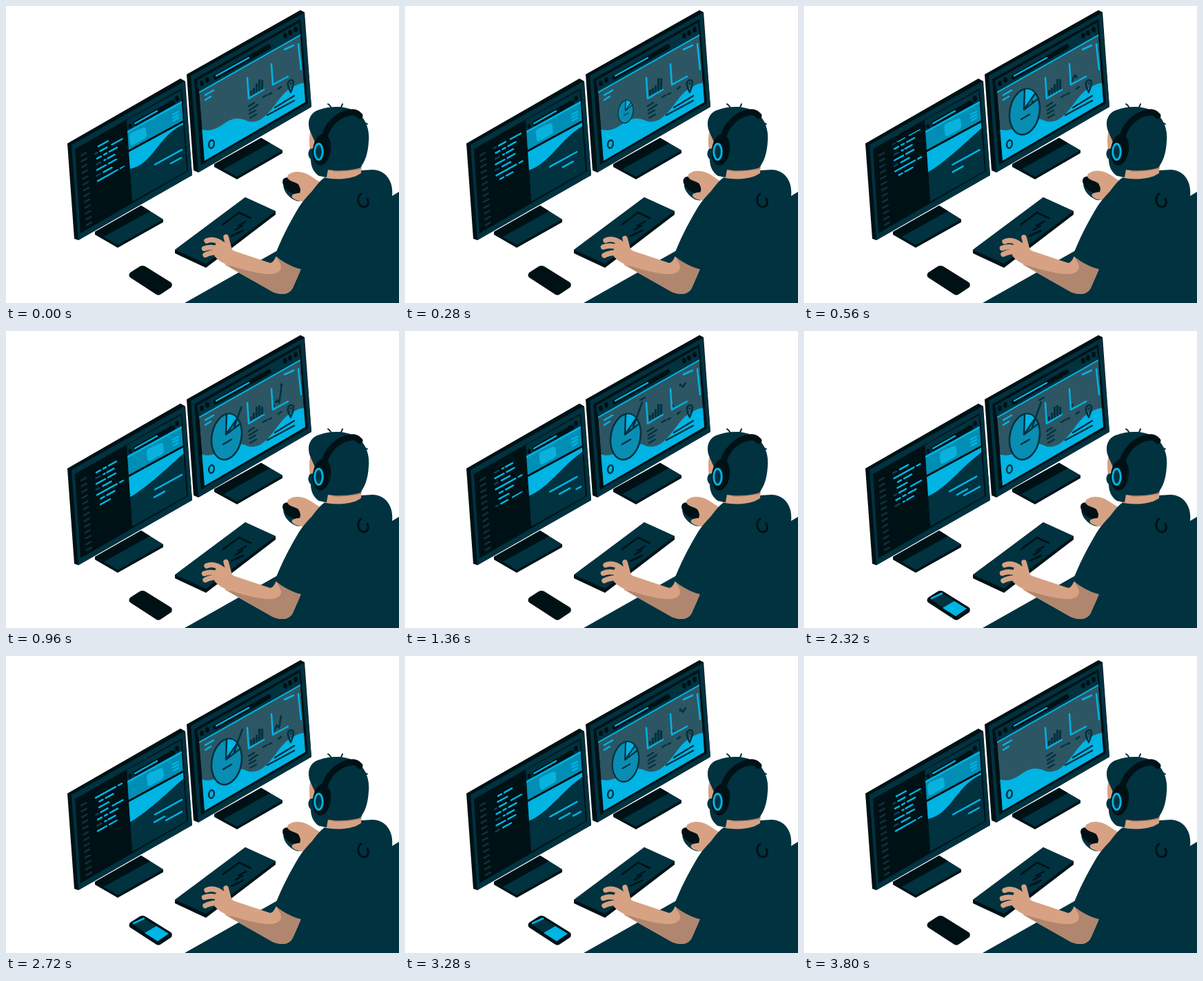
These frames come from a looping animation (570 by 430 pixels, 3.84 s). An HTML page:

```html
<!DOCTYPE html>
<html lang="en">
<head>
<meta charset="utf-8">
<title>Desk with two screens</title>
<style>
html, body { margin: 0; width: 100%; height: 100%; overflow: hidden; background: #fff; }
svg { display: block; width: 100vw; height: 100vh; }
.n { fill: #003240; } .k { fill: #001115; } .c { fill: #00b4e4; }
.s { fill: #d6a283; } .d { fill: #b0866e; } .g { fill: #2c5664; }
.ln, .lk, .lc { fill: none; stroke-width: 2.5; stroke-linecap: round; stroke-linejoin: round; }
.ln { stroke: #003240; } .lk { stroke: #001115; } .lc { stroke: #00b4e4; }
</style>
</head>
<body>
<svg viewBox="0 0 570 430">
  <defs>
    <clipPath id="panel"><path d="M175 165L253.500 122L262 239L183 283Z"/></clipPath>
    <clipPath id="screen"><path d="M280 124L427 41L434 139L288 224Z"/></clipPath>
    <clipPath id="editor"><path d="M124 202L172 176L176 230L126 260Z"/></clipPath>
  </defs>

  <!-- left monitor -->
  <path class="k" d="M129 327L196 289L228 309V313L162 350L129 331Z"/>
  <path class="n" d="M129 327L196 289L228 309L162 346Z"/>
  <path class="k" d="M129 327L196 289L209 297L142 334Z"/>
  <path class="k" d="M89 199L253 105L260 109L270 245L105 339L99 337Z"/>
  <path class="n" d="M95 201L259 109L270 245L105 339Z"/>
  <path class="k" d="M100 207L255 119L264 239L108 329Z"/>
  <path id="gutter" class="lk" style="stroke:#12313b"/>
  <g id="code" clip-path="url(#editor)"></g>
  <g clip-path="url(#panel)">
    <path class="n" d="M175 165L256 120L266 239L183 285Z"/>
    <path d="M175 182L257 137L259 166L177 210Z" fill="#008eb5"/>
    <path class="lc" d="M175 183L257 138"/>
    <path id="box" d="M183 183L199 176Q203 175 203 179L204 187Q204 190 201 192L185 201Q180 203 180 198L179 189Q179 185 183 183Z" fill="#08b2dd"/>
    <path class="lc" d="M242 157L250 153M242 161.500L250 157.500M243 166L250 162"/>
    <path id="hill" class="c"/>
    <path class="lk" style="stroke-width:3" d="M176 211L259 166"/>
    <path id="lines" class="lc"/>
  </g>
  <path class="lk" style="stroke-width:7" d="M188 170L242 140"/>
  <path class="lc" d="M187 170L219 152"/>
  <g class="k"><ellipse cx="180" cy="174" rx="2.500" ry="3.500"/><ellipse cx="239" cy="141" rx="3" ry="4"/><ellipse cx="248" cy="134" rx="3" ry="4"/></g>

  <!-- right monitor -->
  <path class="k" d="M302 229L370 191L401 209V213L335 251L302 233Z"/>
  <path class="n" d="M302 229L370 191L401 209L335 247Z"/>
  <path class="k" d="M302 229L370 191L383 198.500L315 236.500Z"/>
  <path class="k" d="M262 99L427 6L433 9L443 146L279 241L272 238Z"/>
  <path class="n" d="M268 101L432 10L443 146L279 241Z"/>
  <path class="k" d="M273 106L427 19L438 141L283 230Z"/>
  <path class="n" d="M277 108L425 24L427 41L280 124Z"/>
  <path class="lk" style="stroke-width:7" d="M304 103L381 59"/>
  <path class="lc" d="M305 101L352 75"/>
  <g class="k"><ellipse cx="284" cy="112" rx="3" ry="4"/><ellipse cx="292" cy="107" rx="3" ry="4"/><ellipse cx="405" cy="43" rx="3" ry="4"/><ellipse cx="412" cy="39" rx="3" ry="4"/><ellipse cx="420" cy="34" rx="3" ry="4"/></g>
  <g clip-path="url(#screen)">
    <path class="g" d="M280 124L427 41L434 139L288 224Z"/>
    <path class="c" d="M283 178C294 183 306 178 318 169C330 161 340 162 349 166C356 169 366 168 375 160C386 151 394 136 404 126C414 117 424 112 435 111V142L286 226Z"/>
    <path class="lc" style="stroke-width:3" d="M279 125L428 41"/>
  </g>
  <path class="lc" d="M289 129L301 122M289 136L297 131M404 63L417 57M424 55L428 92M350 104L352 134L374 121M385 84L387 114L409 102"/>
  <path class="ln" d="M352 145L360 140M353 151L365 143M353 156L362 151M354 162L363 157M373 132L378 129M381 128L385 126M395 120L399 117M390 147L418 130M379 158L418 137"/>
  <ellipse class="ln" cx="298" cy="200" rx="3.800" ry="5.800" transform="rotate(10 298 200)"/>
  <path class="ln" d="M413 125C410 119 408 115 409 111C411 106 417 106 417 111C417 117 414 121 413 125Z"/>
  <circle class="n" cx="413" cy="112" r="1.500"/>
  <path id="bars" class="ln" style="stroke-width:3.200;stroke-linecap:butt"/>
  <path id="spark" class="ln" pathLength="100"/>
  <g id="pie">
    <ellipse rx="21.500" ry="33.500" transform="rotate(10)" fill="#0a8db2" stroke="#003240" stroke-width="2.500"/>
    <path class="c" d="M-1 -3L0 -32Q9 -34 15 -26Z"/>
    <path class="ln" d="M0 -32L-1 -3L15 -26M-1 -3L20 -19M-5 11L7 4"/>
  </g>
  <path id="pointer" class="ln" pathLength="100" d="M331 139L344 103"/>
  <path id="label" class="ln" d="M341 100L348 96.500"/>

  <!-- desk items -->
  <path class="k" d="M245 353L347 277L391 297V302L290 379L245 358Z"/>
  <path class="n" d="M245 353L347 277L391 297L290 373Z"/>
  <path class="lk" d="M315 316L338 299L355 307M337 318L348 312M333 324L343 318M327 333L344 325"/>
  <path class="k" d="M180 386L194 377Q198 375 202 377L239 400Q242 402 240 407L225 417Q221 420 217 417L180 393Q177 390 180 386Z"/>
  <g id="phone">
    <path class="n" d="M183 388L199 379L236 402L220 413Z"/>
    <path class="c" d="M201 401L218 391L236 402L220 413Z"/>
    <path class="lc" d="M185 387L200 380"/>
  </g>

  <!-- person -->
  <path class="n" d="M259 430L392 355L560 275L570 269V430Z"/>
  <g id="mouse">
    <ellipse class="n" cx="417" cy="268" rx="18" ry="10" transform="rotate(45 417 268)"/>
    <ellipse class="k" cx="414" cy="260" rx="15" ry="9" transform="rotate(40 414 260)"/>
    <path class="s" d="M412 243C418 238 430 240 438 244C446 248 452 254 460 257L438 284C428 282 420 283 415 277C413 273 419 271 426 271C428 266 427 262 424 258C418 254 410 254 408 248C408 245 410 243 412 243Z"/>
  </g>
  <path class="s" d="M326 353L383 372C389 371 390 365 393 360L428 381L416 408C411 418 400 419 387 414L318 375Z"/>
  <path class="d" d="M318 374C350 383 388 396 398 382C402 374 392 367 392 360L428 381L416 408C411 418 400 419 387 414Z"/>
  <g id="hand">
    <path class="s" d="M304 344C308 340 314 341 318 345L331 355L324 377C314 371 306 368 302 361Z"/>
    <g fill="none" stroke="#d6a283" stroke-width="7.500" stroke-linecap="round">
      <path id="f0" d="M291 340Q302 335 316 346"/>
      <path id="f1" d="M287.500 350Q298 346 310 351"/>
      <path id="f2" d="M289 360.500Q299 355 312 357"/>
      <path id="f3" d="M319 335.500L324 354"/>
    </g>
  </g>
  <path class="n" d="M464 247C456 252 450 260 444 268C437 275 430 283 425 291C410 316 399 338 390 361C400 370 415 378 428 381L420 402L410 430H570V300L560 275C562 256 553 238 532 237L515 238Z"/>
  <path class="s" d="M461 238L516 228L515 242C501 252 474 252 460 248Z"/>
  <path class="d" d="M474 238L516 230L515 236C500 239 486 240 474 240Z"/>
  <path class="s" d="M442 180C439 190 440 198 441 212L452 218L460 190Z"/>
  <path class="n" d="M441 207C437 212 438 218 442 222C442 232 446 241 454 246L465 248L470 220L450 205Z"/>
  <path class="n" d="M441 181C436 168 440 154 455 150C470 145 490 144 506 152C520 160 528 176 526 196C525 215 520 226 514 234C500 239 480 239 466 237L448 210C452 200 446 194 441 181Z"/>
  <path class="ln" style="stroke-width:2" d="M467 142Q470 143 473 150M488 142L485 149M514 171Q520 168 524 171"/>
  <path class="lk" style="stroke-width:9" d="M461 195C463 174 481 156 501 154Q508 153 513 159"/>
  <ellipse class="k" cx="458" cy="208" rx="13" ry="23" transform="rotate(8 458 208)"/>
  <ellipse class="lc" style="stroke-width:3;fill:#003240" cx="453.500" cy="211" rx="5.800" ry="11.500"/>
  <path class="lk" style="stroke-width:3" d="M515 272C508 277 510 290 519 291C525 291 527 285 524 279"/>
</svg>
<script>
const LOOP = 3840, HALF = LOOP / 2, ROW = LOOP / 8;
const $ = id => document.getElementById(id);
const clamp = x => Math.max(0, Math.min(1, x));
const ease = x => x * x * (3 - 2 * x);
const ramp = (t, a, b) => ease(clamp((t - a) / (b - a)));
const mix = (a, b, u) => a + (b - a) * u;
const set = (id, key, value) => $(id).setAttribute(key, value);
const show = (id, on) => $(id).style.display = on ? "" : "none";

// Runs along a row: start and end; a negative start marks a dim run.
const rows = [
  [6, 20],
  [-1, 4, 8, 18, 25, 40],
  [3, 9, 13, 17, 21, 32],
  [-2, 8, 13, 15, 18, 28],
  [2, 15, 19, 30],
  [-1, 6, 11, 23],
  [2, 31, 35, 40],
  [7, 12, 16, 27]
];

// A stroke of the given length along the screen's slant
const dash = (x, y, len) => `M${x} ${y}l${len} ${-len * 0.55}`;

const codePaths = ["#00b4e4", "#123f4d"].map(color => {
  const p = document.createElementNS("http://www.w3.org/2000/svg", "path");
  p.setAttribute("class", "lc");
  p.style.stroke = color;
  $("code").append(p);
  return p;
});

set("gutter", "d", Array.from({ length: 13 }, (_, i) => dash(109 + i * 0.65, 216.5 + i * 8.4, 7)).join(""));
set("spark", "d", "M389 108L393 100L396 104L399 87L399 77L403 81L407 75");

function drawCode(t) {
  const step = Math.floor(t / ROW), part = t % ROW / ROW;
  const shift = ramp(part, 0, 0.25), typed = 42 * clamp((part - 0.1) / 0.8);
  const out = ["", ""];
  for (let k = 0; k < 8; k++) {
    const row = rows[(step + k) % 8], pos = k - shift;
    for (let i = 0; i < row.length; i += 2) {
      const a = Math.abs(row[i]), b = k === 7 ? Math.min(row[i + 1], typed) : row[i + 1];
      if (b > a) out[row[i] < 0 ? 1 : 0] += dash(128 + pos * 0.5 + a, 206.5 + pos * 8 - a * 0.55, b - a);
    }
  }
  codePaths.forEach((p, i) => p.setAttribute("d", out[i]));
}

function drawPanel(t) {
  const h = t % HALF;
  const u = ramp(h, 0, 620) - ramp(h, 1000, 1860);
  set("box", "transform", `translate(${25 * u} ${-13.5 * u})`);
  set("hill", "d", `M177 210L259 166V${mix(171, 176, u)}C${mix(222, 236, u)} ${mix(184, 196, u)} ${mix(214, 204, u)} ${mix(230, 227, u)} 179 ${mix(236, 241, u)}Z`);
  const x = 216 - 6 * Math.sin(Math.PI * u), x2 = 239 - 24 * u;
  const x3 = 258 - 26 * (ramp(t, 1050, 1800) - ramp(t, 2900, 3700));
  set("lines", "d", dash(x, 229.5 + (216 - x) * 0.55, 39) + dash(x2, 228 + (239 - x2) * 0.53, 15) +
    (x3 < 255 ? dash(x3, 238 - (x3 - 232) * 0.55, 255 - x3) : ""));
}

function drawCharts(t) {
  const size = ramp(t, 80, 480) - clamp((t - 3000) / 560) ** 3;
  set("pie", "transform", `translate(320 153) scale(${Math.max(0, size)})`);
  show("pie", size > 0.01);
  const line = 100 * (ramp(t, 480, 1150) - ramp(t, 2620, 3150));
  set("pointer", "stroke-dasharray", `${line} 200`);
  show("pointer", line > 0.5);
  show("label", t > 1150 && t < 2600);

  const sway = Math.sin(2 * Math.PI * t / LOOP * 3);
  set("bars", "d", [7, 9, 13, 17, 14].map((len, i) => {
    const grow = 1 + 0.22 * sway * Math.cos(i * 1.7);
    return `M${355.5 + i * 4} ${129.5 - i * 2.1}v${-len * grow}`;
  }).join(""));

  const h = t % HALF;
  const head = 100 * clamp((h - 380) / 720), tail = 72 * ramp(h, 860, 1300) + 28 * ramp(h, 1420, 1760);
  set("spark", "stroke-dasharray", `0 ${tail} ${Math.max(0, head - tail)} 200`);
  show("spark", head > tail + 0.5);
}

function drawHands(t) {
  const a = 2 * Math.PI * t / LOOP;
  for (let i = 0; i < 4; i++) set("f" + i, "transform", `translate(0 ${1.2 * Math.sin(a * 8 + i * 1.6)})`);
  const m = t < HALF ? Math.max(0, Math.sin(a * 2)) : 0;
  set("mouse", "transform", `translate(${3 * m} ${-1.5 * m})`);
}

function draw(time) {
  const t = Math.floor(time % LOOP / 40) * 40;
  drawCode(t);
  drawPanel(t);
  drawCharts(t);
  drawHands(t);
  show("phone", t >= 1640 && t < 3520);
}

const start = performance.now();
function tick() {
  draw(performance.now() - start);
  requestAnimationFrame(tick);
}
tick();
</script>
</body>
</html>
```
